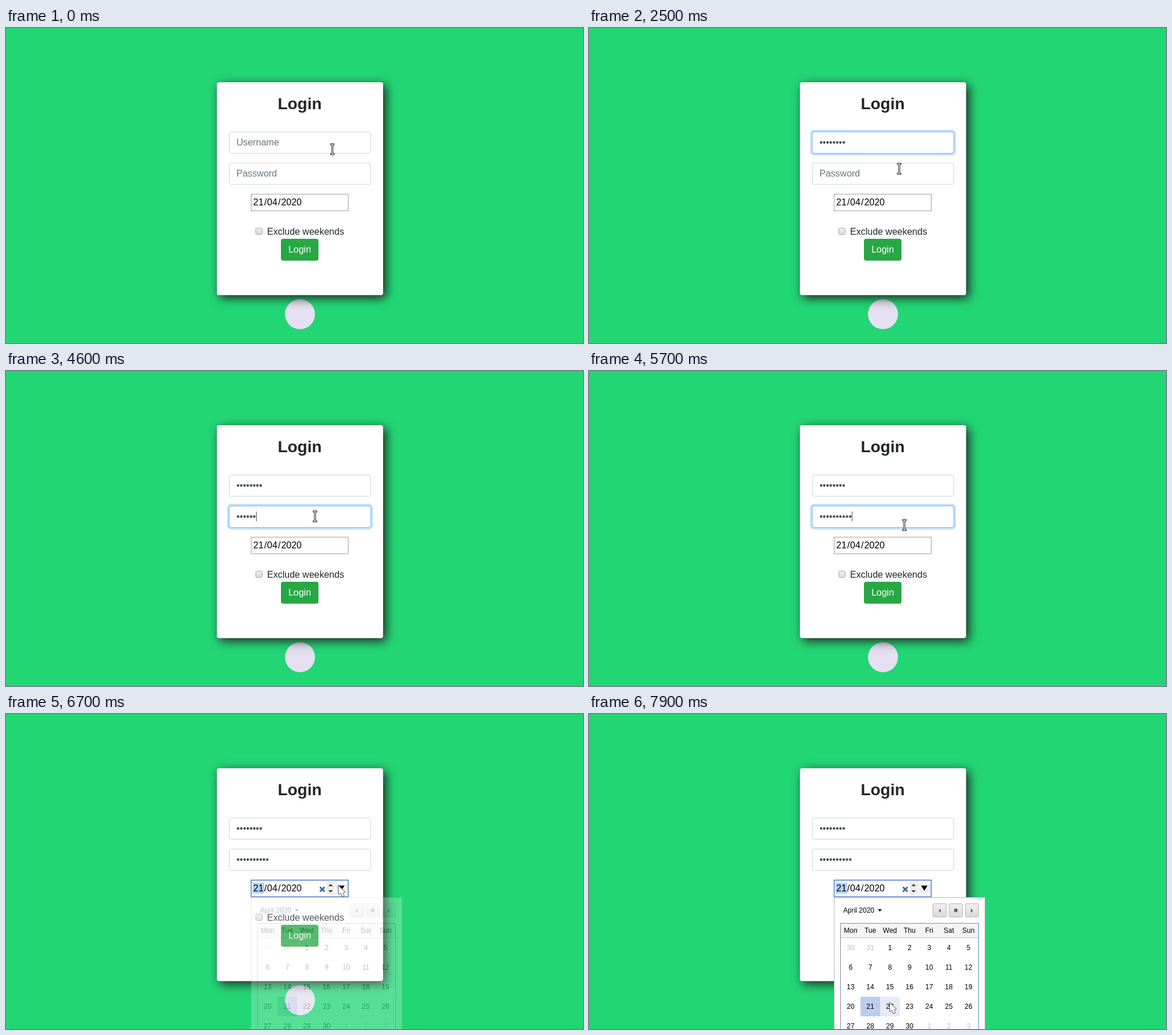
An HTML page for the animation above (8 s loop, 999 px wide and 547 px high).

```html
<!DOCTYPE html>
<html lang="en">
<head>
<meta charset="utf-8">
<title>Login form</title>
<style>
  html, body { margin: 0; width: 100%; height: 100%; overflow: hidden; background: #22d674; }
  svg { display: block; font: 16px "Liberation Sans", Arial, sans-serif; }
  .mid { text-anchor: middle; }
  .placeholder { fill: #6c757d; }
  .dots { fill: #495057; }
  #popup { font-size: 12px; }
  .other { fill: #bfbfbf; }
</style>
</head>
<body>
<svg width="999" height="547" viewBox="0 0 999 547">
  <defs>
    <filter id="shadow" x="-20%" y="-20%" width="140%" height="140%" color-interpolation-filters="sRGB">
      <feDropShadow dx="5" dy="5" stdDeviation="9" flood-color="#222"/>
    </filter>
    <linearGradient id="button" x2="0" y2="1">
      <stop stop-color="#f0f0f0"/><stop offset="1" stop-color="#dadada"/>
    </linearGradient>
  </defs>

  <circle cx="509" cy="497" r="26" fill="#e4e0f1"/>
  <g filter="url(#shadow)"><rect x="365" y="94" width="288" height="370" rx="4" fill="#fff"/></g>
  <rect x="365.5" y="94.5" width="287" height="369" rx="3.5" fill="none" stroke="#000" stroke-opacity=".125"/>
  <text class="mid" x="508.5" y="141" font-size="28" font-weight="bold" fill="#212529">Login</text>

  <g id="fields"></g>

  <rect id="dateBox" x="424.5" y="288.5" width="168" height="29" fill="#fff"/>
  <rect id="daySelect" x="427" y="293" width="20" height="19" fill="#b0d2fb"/>
  <text y="308"><tspan x="428">21</tspan><tspan x="447">/</tspan><tspan x="452">04</tspan><tspan x="471">/</tspan><tspan x="476.4">2020</tspan></text>
  <g id="dateTools">
    <path d="M543.5 300.5l8 8m0-8l-8 8" stroke="#3560a8" stroke-width="2.6"/>
    <path d="M555 291h15v23h-15zM571 295h20v16h-20z" fill="#efefef"/>
    <path d="M558 299h8l-4-4zM558 306h8l-4 4z" fill="#444"/>
    <path d="M575 298h11l-5.5 9z"/>
  </g>

  <rect x="432.5" y="347.5" width="11" height="11" rx="2" fill="url(#button)" stroke="#a5a5a5"/>
  <text x="452" y="359" fill="#212529">Exclude weekends</text>
  <rect x="476" y="366" width="65" height="38" rx="4" fill="#28a745"/>
  <text class="mid" x="508.5" y="390" fill="#fff">Login</text>

  <g id="popup">
    <rect x="424.5" y="318.5" width="261" height="260" fill="#fff" stroke="#b5b5b5"/>
    <text x="440" y="345">April 2020</text>
    <path d="M500 339h7l-3.5 4z"/>
    <g fill="url(#button)" stroke="#b8b8b8">
      <rect x="595.5" y="329.5" width="23" height="23" rx="1"/>
      <rect x="623.5" y="329.5" width="23" height="23" rx="1"/>
      <rect x="651.5" y="329.5" width="23" height="23" rx="1"/>
    </g>
    <g fill="#666">
      <path d="M609 338v7l-4-3.5zM661 338v7l4-3.5z"/>
      <circle cx="635" cy="341" r="3.2"/>
    </g>
    <rect x="436" y="364" width="238" height="24" fill="#f5f5f5"/>
    <path d="M436 388.5h238" stroke="#bbb"/>
    <path d="M435.5 547V363.5H675" fill="none" stroke="#858a94"/>
    <path d="M674.5 364v183" stroke="#4d90fe"/>
    <rect x="470" y="491" width="34" height="34" fill="#bccdeb"/>
    <rect id="hover" width="34" height="34" fill="#e4ebf7"/>
    <g id="days" class="mid"></g>
  </g>

  <g id="beam" stroke-linecap="square" fill="none">
    <path id="beamShape" d="M-2-8.5h1.2l.8.8.8-.8h1.2M0-7.5v15M-2 8.5h1.2l.8-.8.8.8h1.2" stroke="#444" stroke-width="3"/>
    <use href="#beamShape"/>
    <path d="M-2-8.5h1.2l.8.8.8-.8h1.2M0-7.5v15M-2 8.5h1.2l.8-.8.8.8h1.2" stroke="#fff" stroke-width="1.1"/>
  </g>
  <path id="arrow" d="M.5.5v16.3l4-2.6 2.4 6.2 3.8-1.6-2-5.2 3.6-1.4z" fill="#fff" stroke="#555" stroke-linejoin="round"/>
</svg>

<script>
const $ = id => document.getElementById(id);
const clamp = v => Math.max(0, Math.min(1, v));
const show = (el, on) => el.style.display = on ? '' : 'none';
const place = (el, x, y) => el.setAttribute('transform', `translate(${x} ${y})`);

const LOOP = 8000, STEP = 100;

// typed: [time, number of characters]; caret: visible intervals
const fields = [
  { label: 'Username', y: 180, focus: 400, blur: 2900, caret: [[500, 2400]],
    typed: [[1100, 1], [1300, 2], [1400, 3], [1500, 4], [1600, 6], [1800, 7], [1900, 8]] },
  { label: 'Password', y: 234, focus: 2900, blur: 6600, caret: [[2900, 3400], [3600, 5800]],
    typed: [[3600, 2], [3800, 3], [4100, 4], [4400, 5], [4600, 6], [4800, 7], [5000, 9], [5200, 10]] }
];

// Pointer positions: [time, x, y]
const path = [
  [0, 565, 210], [400, 565, 210], [500, 565, 209], [2200, 565, 209], [2500, 537, 244],
  [2800, 537, 244], [2900, 535, 252], [5600, 535, 252], [5700, 546, 267], [5900, 562, 287],
  [6000, 569, 293], [6100, 572, 295], [6200, 572, 295], [6300, 575, 297], [7000, 575, 297],
  [7300, 558, 355], [7700, 521, 490], [7800, 521, 490], [7900, 520, 500]
];

for (const f of fields) {
  $('fields').insertAdjacentHTML('beforeend', `<g>
    <rect x="384.4" y="${f.y - 1.6}" width="249.2" height="41.2" rx="5.6" fill="none" stroke="#bfdeff" stroke-width="3.2"/>
    <rect x="386.5" y="${f.y + .5}" width="245" height="37" rx="3.5" fill="#fff" stroke="#ced4da"/>
    <rect x="386.5" y="${f.y + .5}" width="245" height="37" rx="3.5" fill="none" stroke="#80bdff"/>
    <text x="399" y="${f.y + 24}"></text>
    <rect y="${f.y + 10}" width="1" height="17" fill="#495057"/></g>`);
  [f.ring, , f.border, f.text, f.bar] = $('fields').lastElementChild.children;
}

const addDay = (text, col, y, cls = '') =>
  $('days').insertAdjacentHTML('beforeend', `<text class="${cls}" x="${453 + col * 34}" y="${y}">${text}</text>`);
['Mon', 'Tue', 'Wed', 'Thu', 'Fri', 'Sat', 'Sun'].forEach((name, i) => addDay(name, i, 380));
for (let i = 0; i < 35; i++) {
  const day = i < 2 ? 30 + i : (i - 2) % 30 + 1;
  addDay(day, i % 7, 410 + Math.floor(i / 7) * 34, i < 2 || i > 31 ? 'other' : '');
}

function pointerAt(t) {
  const i = path.findIndex(p => p[0] > t);
  if (i < 0) return path.at(-1).slice(1);
  const [t0, x0, y0] = path[i - 1], [t1, x1, y1] = path[i], k = (t - t0) / (t1 - t0);
  return [Math.round(x0 + (x1 - x0) * k), Math.round(y0 + (y1 - y0) * k)];
}

function drawField(f, t) {
  const count = f.typed.reduce((n, [at, c]) => t >= at ? c : n, 0);
  const ease = at => clamp((t - at + 50) / 150);
  f.ring.style.opacity = f.border.style.opacity = ease(f.focus) - ease(f.blur);
  f.text.textContent = count ? '•'.repeat(count) : f.label;
  f.text.setAttribute('class', count ? 'dots' : 'placeholder');
  f.bar.setAttribute('x', Math.round(399 + 5.6 * count));
  show(f.bar, f.caret.some(([on, off]) => t >= on && t < off));
}

function draw(t) {
  fields.forEach(f => drawField(f, t));

  const dateFocused = t >= 6600;
  $('dateBox').setAttribute('stroke', dateFocused ? '#5a87cf' : '#a0a0a0');
  $('dateBox').setAttribute('stroke-width', dateFocused ? 1.7 : 1);
  show($('daySelect'), dateFocused);
  show($('dateTools'), t >= 6000);

  const fade = clamp((t - 6600) / 300);
  show($('popup'), fade > 0);
  $('popup').style.opacity = fade ** 1.3;

  const [x, y] = pointerAt(t), overButton = t >= 6000;
  show($('beam'), !overButton);
  show($('arrow'), overButton);
  place($('beam'), x, y + .5);
  place($('arrow'), x, y);

  const col = Math.floor((x - 436) / 34), row = Math.floor((y - 389) / 34);
  show($('hover'), row >= 0);
  place($('hover'), 436 + col * 34, 389 + row * 34);
}

const start = performance.now();
function tick() {
  const t = (performance.now() - start) % LOOP;
  draw(Math.floor(t / STEP) * STEP);
  requestAnimationFrame(tick);
}
tick();
</script>
</body>
</html>
```
